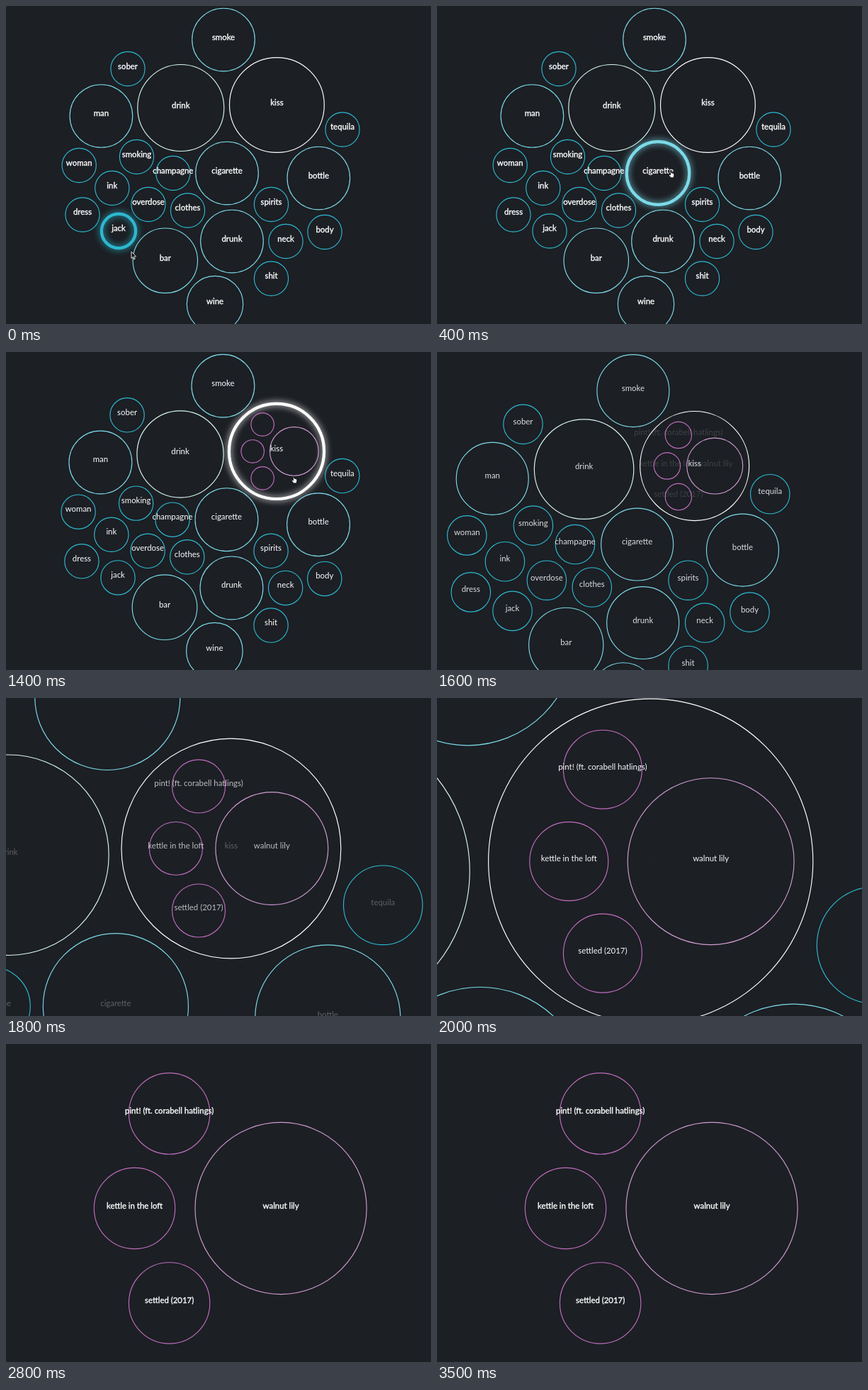
These frames come from a looping animation (600x448 px, 3.6 s). An HTML page with a canvas:

```html
<!DOCTYPE html>
<html>
<head>
<meta charset="utf-8">
<style>
html, body { margin: 0; height: 100%; overflow: hidden; background: #1c1f24; }
canvas { display: block; }
</style>
</head>
<body>
<canvas width="600" height="448"></canvas>
<script>
const ctx = document.querySelector('canvas').getContext('2d');
const LOOP = 3600, STEP = 100;
const ZOOM_START = 1326, ZOOM_TIME = 815, CLICK = 1400;
const CENTER = { x: 300.5, y: 231.5 };
const SMALL = '#2bb9d0', MEDIUM = '#7bdae8', LARGE = '#d6f5f0';
const PINK = '#bf6dbd', PALE_PINK = '#d09bd0';

const bubble = (label, x, y, r = 24.1, color = SMALL) => ({ label, x, y, r, color });
const kiss = bubble('kiss', 382.4, 139.5, 66.9, '#fff');
const words = [
  bubble('smoke', 307, 47.5, 44.3, MEDIUM),
  bubble('sober', 172, 88.5),
  bubble('drink', 246.8, 143.5, 61, LARGE),
  kiss,
  bubble('man', 134.4, 155, 44.3, MEDIUM),
  bubble('tequila', 475, 174),
  bubble('smoking', 184.5, 212.5),
  bubble('woman', 103.2, 224.5),
  bubble('champagne', 235.8, 235.5),
  bubble('cigarette', 312, 235.5, 44.3, MEDIUM),
  bubble('bottle', 441.3, 242.5, 44.3, MEDIUM),
  bubble('ink', 149.8, 256.5),
  bubble('overdose', 201, 279.5),
  bubble('spirits', 374.5, 279.5),
  bubble('clothes', 256.5, 288),
  bubble('dress', 108, 294),
  bubble('jack', 159, 317),
  bubble('body', 450, 318.5),
  bubble('drunk', 319, 331.5, 44.3, MEDIUM),
  bubble('neck', 395, 331.5),
  bubble('bar', 224.8, 358.7, 45.7, MEDIUM),
  bubble('shit', 374.5, 384),
  bubble('wine', 295, 420, 39.7, MEDIUM)
];
const song = (label, dx, dy, r, color) => bubble(label, kiss.x + dx, kiss.y + dy, r, color);
const songs = [
  song('pint! (ft. corabell hatlings)', -19.8, -37.8, 16.2, PINK),
  song('kettle in the loft', -33.7, 0, 16.2, PINK),
  song('settled (2017)', -19.8, 37.8, 16.2, PINK),
  song('walnut lily', 24.8, 0, 34.3, PALE_PINK)
];

const clamp = v => Math.max(0, Math.min(1, v));
const cubicInOut = p => p < .5 ? 4 * p ** 3 : 1 - 4 * (1 - p) ** 3;

// Smooth zoom-and-pan (van Wijk & Nuij) from the overview to the kiss bubble.
const dx = kiss.x - CENTER.x, dy = kiss.y - CENTER.y, dist = Math.hypot(dx, dy);
const w0 = 480, w1 = w0 / 3.53;
const slope = (sign, w) => (w1 * w1 - w0 * w0 + sign * 4 * dist * dist) / (4 * w * dist);
const r0 = Math.asinh(-slope(1, w0)), r1 = Math.asinh(-slope(-1, w1));

function viewAt(e) {
  const a = r0 + (r1 - r0) * e;
  const u = w0 / (2 * dist) * (Math.cosh(r0) * Math.tanh(a) - Math.sinh(r0));
  return { x: CENTER.x + dx * u, y: CENTER.y + dy * u, k: Math.cosh(a) / Math.cosh(r0) };
}

function pointer(t) {
  const path = [[-100, 160, 318], [0, 177, 346], [600, 405, 175]];
  const [a, b] = t < 0 ? path : path.slice(1);
  const p = clamp((t - a[0]) / (b[0] - a[0]));
  return { x: a[1] + (b[1] - a[1]) * p, y: a[2] + (b[2] - a[2]) * p };
}

const hit = p => words.find(b => Math.hypot(p.x - b.x, p.y - b.y) < b.r);

function project(b, view) {
  return {
    x: CENTER.x + (b.x - view.x) * view.k,
    y: CENTER.y + (b.y - view.y) * view.k,
    r: b.r * view.k
  };
}

function ring(b, view, hot) {
  const { x, y, r } = project(b, view);
  ctx.save();
  ctx.strokeStyle = b.color;
  ctx.lineWidth = hot ? 4.2 : 1.15;
  if (hot) {
    ctx.shadowColor = b.color;
    ctx.shadowBlur = 10;
  }
  ctx.beginPath();
  ctx.arc(x, y, r, 0, 7);
  ctx.stroke();
  ctx.restore();
}

function caption(b, view, alpha, heavy) {
  const { x, y } = project(b, view);
  ctx.globalAlpha = alpha;
  ctx.fillText(b.label, x, y);
  if (heavy) ctx.strokeText(b.label, x, y);
  ctx.globalAlpha = 1;
}

function shape(x, y, points, fill, edge) {
  ctx.save();
  ctx.translate(x, y);
  ctx.beginPath();
  points.forEach(p => ctx.lineTo(...p));
  ctx.closePath();
  ctx.lineWidth = 1;
  ctx.lineJoin = 'round';
  ctx.fillStyle = fill;
  ctx.strokeStyle = edge;
  ctx.fill();
  ctx.stroke();
  ctx.restore();
}

const ARROW = [[0, 0], [0, 9.5], [2.2, 7.6], [3.8, 11], [5.2, 10.3], [3.7, 7], [6.5, 6.8]];
const HAND = [[0, 0], [1.4, 0], [2, 3], [5.5, 4], [6, 6], [5, 10], [1, 10], [-2, 6], [-1.5, 5], [.6, 6]];

function draw(now) {
  const t = Math.floor(now % LOOP / STEP) * STEP;
  const p = clamp((t - ZOOM_START) / ZOOM_TIME);
  const e = cubicInOut(p), view = viewAt(e);
  const still = t < CLICK || p === 1;
  const pointing = t <= CLICK;
  const hot = pointing && hit(pointer(t - 100));

  ctx.fillStyle = '#1c1f24';
  ctx.fillRect(0, 0, 600, 448);
  if (p < 1) words.forEach(b => ring(b, view, b === hot));
  if (t >= CLICK) songs.forEach(b => ring(b, view));

  ctx.font = '11.4px Lato, sans-serif';
  ctx.textAlign = 'center';
  ctx.fillStyle = ctx.strokeStyle = '#fff';
  ctx.lineWidth = .35;
  if (p < 1) words.forEach(b => caption(b, view, 1 - e, still));
  if (p > 0) songs.forEach(b => caption(b, view, e, still));

  if (pointing) {
    const { x, y } = pointer(t);
    if (hit({ x, y })) shape(x, y, HAND, '#fff', '#111');
    else shape(x, y, ARROW, '#111', '#ddd');
  }
}

const start = performance.now();
(function tick() {
  draw(performance.now() - start);
  requestAnimationFrame(tick);
})();
</script>
</body>
</html>
```
